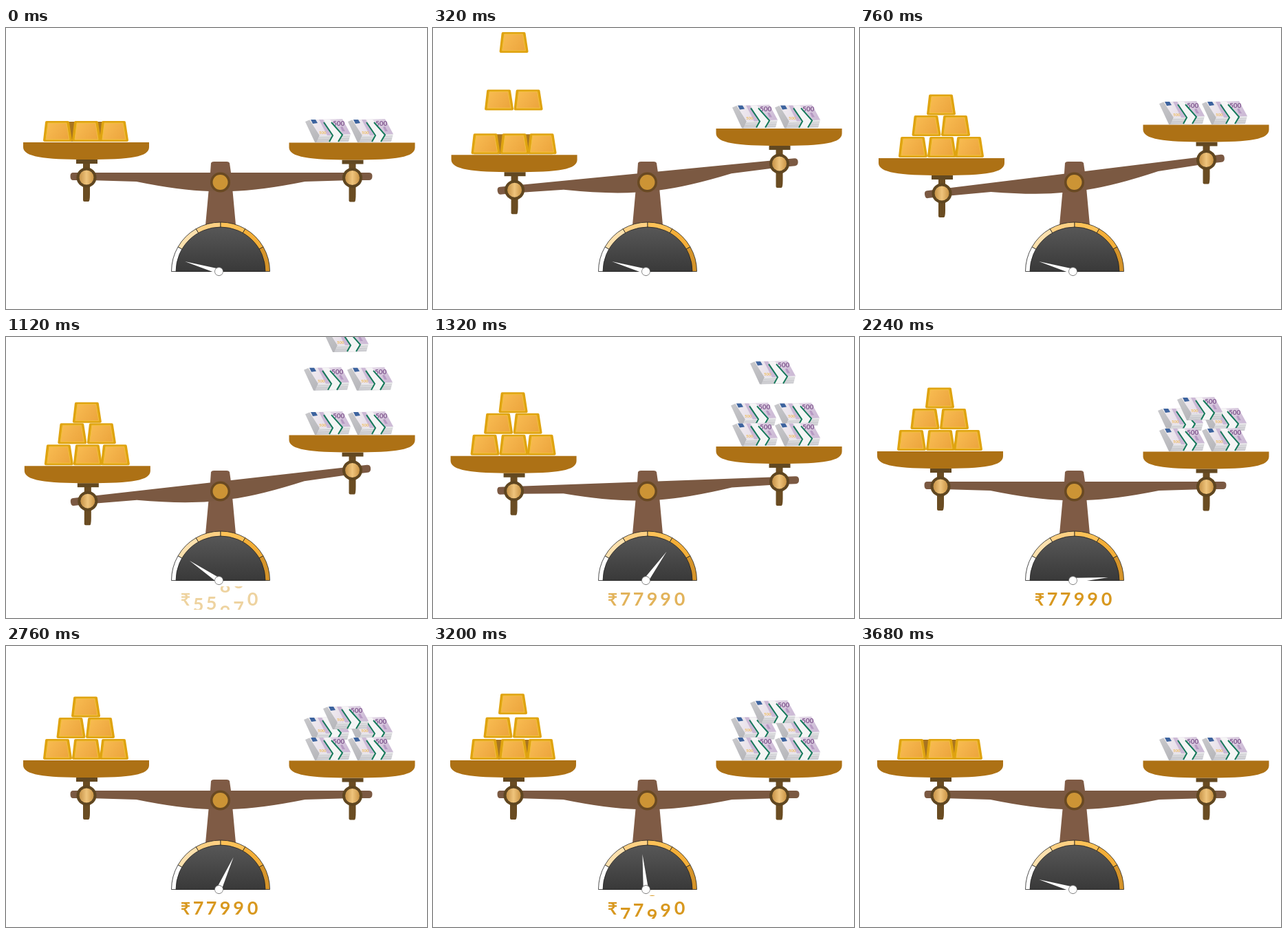
Write an HTML page with a canvas that moves like this. It is 612 px wide and 408 px high and loops after 3720 ms.

```html
<!DOCTYPE html>
<html lang="en">
<head>
<meta charset="utf-8">
<title>Gold and cash on a scale</title>
<style>
html, body { margin: 0; width: 100%; height: 100%; overflow: hidden; background: #fff; }
canvas { display: block; }
</style>
</head>
<body>
<canvas id="stage" width="612" height="408"></canvas>
<script>
const LOOP = 3720, STEP = 40;
const ctx = document.getElementById('stage').getContext('2d');

const clamp = x => Math.min(1, Math.max(0, x));
const ramp = (t, a, b) => clamp((t - a) / (b - a));
const ease = (t, a, b) => (1 - Math.cos(Math.PI * ramp(t, a, b))) / 2;

function gradient(x0, y0, x1, y1, ...colors) {
  const g = ctx.createLinearGradient(x0, y0, x1, y1);
  colors.forEach((c, i) => g.addColorStop(i / (colors.length - 1), c));
  return g;
}

function shape(d, fill, stroke, width = 1) {
  const p = new Path2D(d);
  if (fill) { ctx.fillStyle = fill; ctx.fill(p); }
  if (stroke) { ctx.strokeStyle = stroke; ctx.lineWidth = width; ctx.stroke(p); }
}

function disc(x, y, r, fill) {
  ctx.beginPath();
  ctx.arc(x, y, r, 0, 7);
  ctx.fillStyle = fill;
  ctx.fill();
}

function at(x, y, draw, angle = 0) {
  ctx.save();
  ctx.translate(x, y);
  ctx.rotate(angle);
  draw();
  ctx.restore();
}

function label(text, x, y, font, fill) {
  ctx.font = font;
  ctx.fillStyle = fill;
  ctx.fillText(text, x, y);
}

// Height of a falling then departing item relative to its resting place
const lift = (t, land, speed, leave, pull) =>
  -Math.max(0, land - t) * speed - pull * Math.max(0, t - leave) ** 2;

function bar(x, y) {
  at(x, y, () => {
    shape('M5 0H36Q38 0 38 2L42 28Q42 30 40 30H2Q0 30 0 28L3 2Q3 0 5 0Z', '#dfa310');
    shape('M7 3H34L38 27H4Z', gradient(3, 3, 38, 27, '#f9bd52', '#f2b048', '#eca43c'), '#f3c13c');
  });
}

function bundle(x, y) {
  at(x, y, () => {
    shape('M0 4L7 1L21 24L17 34H14Z', gradient(0, 0, 17, 34, '#c9c9cc', '#b6b6ba'));
    shape('M21 24L66 22L63 33L16 34Z', gradient(0, 24, 0, 34, '#e6e6e8', '#c6c6cb'));
    shape('M20 27L65 25M18 30L64 28', null, '#bcbcc2', .6);
    shape('M6 1L54 0L66 22L21 24Z', gradient(8, 0, 62, 12, '#f1eef0', '#e6dce9', '#cdbbd6'));
    shape('M20 1L26 1L38 24L32 24Z', '#cbb8d5');
    shape('M54 11L58 18L54 18L51 12Z', '#b79ac4');
    shape('M8 1L15 1L18 6L11 7Z', '#3c639e');
    label('500', 20, 22, 'bold 6px Lato, sans-serif', '#efc063');
    label('500', 40, 10, 'bold 10px Lato, sans-serif', '#80578f');
    shape('M27 1L36 1L54 23L48 33L35 33L40 24Z', '#f5f5f5');
    shape('M27 5L40 24L35 33M38 5L54 23L48 33', null, '#14795a', 2);
  });
}

function pan(x, y) {
  at(x, y, () => {
    shape('M-5 26H5V75Q5 86 3 86H-3Q-5 86 -5 84Z', '#6a4c22');
    shape('M-15 25H16V31H-15Z', '#624821');
    disc(0, 51, 14.5, '#5f4620');
    disc(0, 51, 10.5, gradient(-10, 0, 10, 0, '#c8954a', '#efc47c', '#cc9748'));
    shape('M-92 0H91V7C91 21 65 25 0 25C-62 25 -92 21 -92 7Z', '#ad7115');
  });
}

function beam(angle) {
  shape('M298 196Q299 194 302 194H321Q324 194 325 196L327 210L334 286H290L297 210Z', '#7f5b45');
  at(311.5, 224, () => shape(
    'M-214 -14H216Q221 -14 221 -9Q221 -3 216 -3L190 -3L123 -1Q58 12 16 13H-16Q-58 12 -122 -1L-190 -3H-214Q-218 -3 -218 -9Q-218 -14 -214 -14Z',
    '#7b5942'), angle);
  disc(311.5, 224, 14.5, '#694922');
  disc(311.5, 224, 11, '#cc9435');
}

function gauge(angle) {
  const colors = ['#ffffff', '#fce0ad', '#fdd083', '#fdc156', '#f3ae38', '#d5942a'];
  at(312, 353.5, () => {
    colors.forEach((c, i) => {
      const a = Math.PI * (1 + i / 6);
      ctx.beginPath();
      ctx.moveTo(0, 0);
      ctx.arc(0, 0, 71.5, a, a + Math.PI / 6);
      ctx.closePath();
      ctx.fillStyle = c;
      ctx.fill();
      ctx.strokeStyle = '#222';
      ctx.lineWidth = .8;
      ctx.stroke();
    });
    shape('M-65 0A65 64.5 0 0 1 65 0Z', gradient(0, -64, 0, 0, '#575757', '#393939'), '#222', .8);
  });
  at(309.5, 353.5, () => shape('M-51.5 0L-3 -3.5V3.5Z', '#fff'), angle * Math.PI / 180);
  at(309.5, 353.5, () => {
    disc(0, 0, 6.4, '#777');
    disc(0, 0, 5.6, '#fff');
  });
}

function needleAngle(t) {
  if (t < 1600) return 16.3 + 164.7 * ease(t, 1012, 1520);
  if (t < 3000) return 138 + 43 * Math.cos((t - 1600) / 700 * 2 * Math.PI);
  return 181 - 164.7 * ease(t, 3000, 3360);
}

// Each wheel: final digit, centre, roll-in end, roll-out start
const wheels = [
  [7, 279.5, 1315, 3155], [7, 298.5, 1312, 3175], [9, 318.5, 1178, 3157],
  [9, 338, 1286, 3177], [0, 358.5, 1200, 3155]
];

function price(t) {
  const font = 'bold 27px Lato, "Noto Sans", sans-serif', color = '#d8981f';
  const base = 390, pitch = 38;
  ctx.save();
  ctx.globalAlpha = ramp(t, 850, 1490) * (1 - ramp(t, 3360, 3680));
  ctx.beginPath();
  ctx.rect(250, 362, 122, 34);
  ctx.clip();
  ctx.textAlign = 'center';
  label('₹', 261, base, 'bold 25px Lato, "Noto Sans", sans-serif', color);
  for (const [digit, x, end, leave] of wheels) {
    const value = digit * (ease(t, 800, end) - ease(t, leave, leave + 380));
    for (let k = Math.floor(value); k <= Math.ceil(value); k++)
      label(k, x, base + (k - value) * pitch, font, color);
  }
  ctx.restore();
}

function gold(t) {
  const middle = lift(t, 402, .4, 3180, .0013);
  const top = lift(t, 580, .33, 3140, .0012);
  if (middle) shape('M62 136H170L172 165H58Z', '#a87420');
  [54, 96, 136].forEach(x => bar(x, 135));
  if (t < 3560) {
    [73.5, 116].forEach(x => bar(x, 104 + middle));
    bar(95, 73.5 + top);
  }
}

function cash(t) {
  const middle = lift(t, 1280, .22, 3180, .0013);
  const top = lift(t, 1620, .15, 3120, .0013);
  const flying = t > 700 && t < 3560;
  if (flying) [433, 496].forEach(x => bundle(x, 103 + middle));
  [435, 497].forEach(x => bundle(x, 132));
  if (flying) bundle(461, 87 + top);
}

function draw(t) {
  const tilt = ease(t, 20, 450) - ease(t, 1040, 1480);
  ctx.clearRect(0, 0, 612, 408);
  beam(-tilt * 7 * Math.PI / 180);
  at(2 * tilt, 23 * tilt, () => { pan(117, 166); gold(t); });
  at(0, -26 * tilt, () => { pan(503.5, 166.5); cash(t); });
  gauge(needleAngle(t));
  price(t);
}

const start = performance.now();
function frame() {
  const t = (performance.now() - start) % LOOP;
  draw(Math.floor(t / STEP) * STEP);
  requestAnimationFrame(frame);
}
frame();
</script>
</body>
</html>
```
